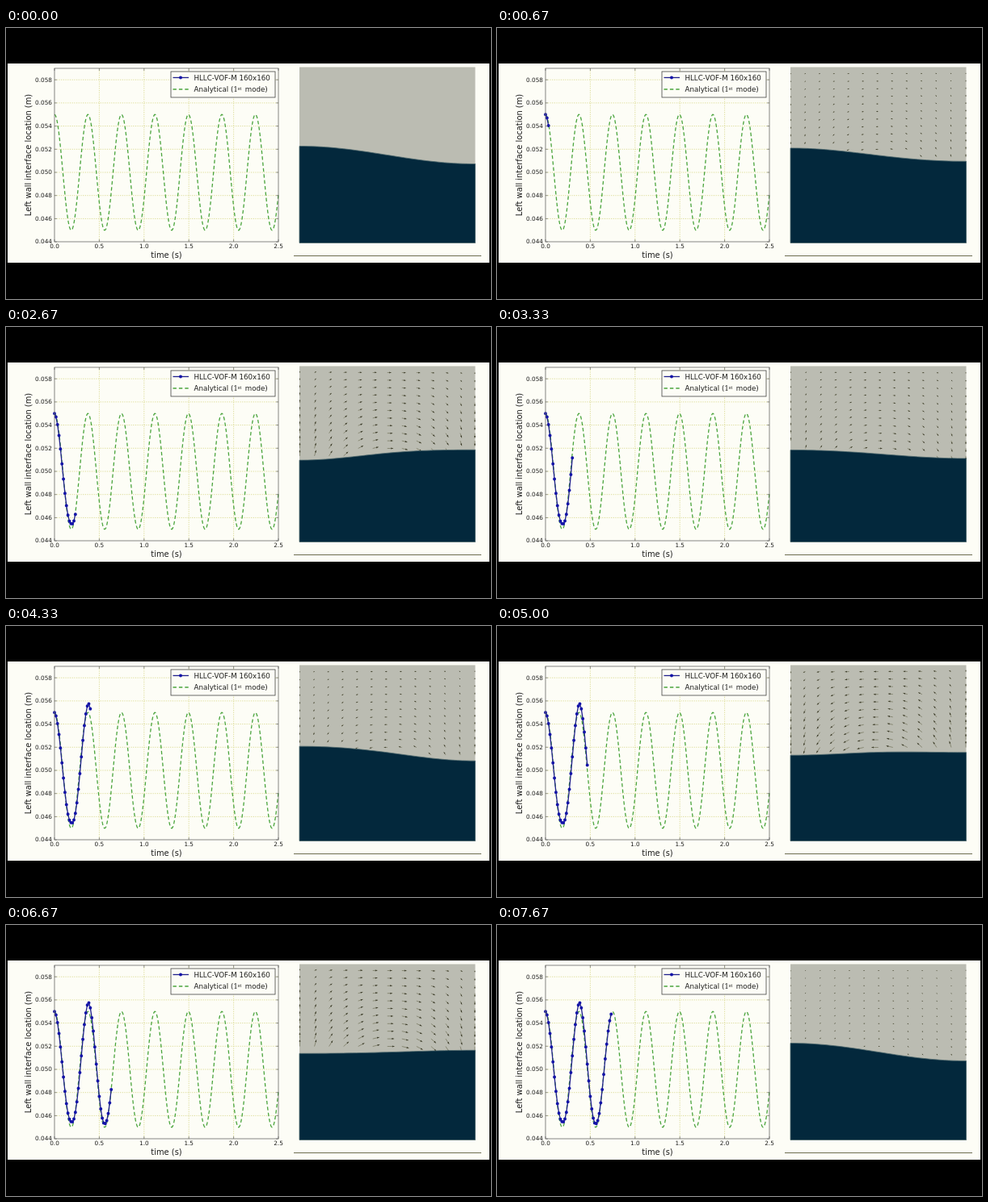
These frames come from a looping animation (600 px wide and 336 px high, 8 s). An HTML page:

```html
<!DOCTYPE html>
<html lang="en">
<head>
<meta charset="utf-8">
<title>Sloshing wave</title>
<style>
  html, body { margin: 0; width: 100%; height: 100%; overflow: hidden; background: #000; }
  svg { display: block; width: 100vw; height: 100vh; font-family: "DejaVu Sans", sans-serif; fill: #1c1c1c; }
  path { fill: none; }
  #grid { stroke: #d9d98c; stroke-width: .9; stroke-dasharray: 1.2 1.5; }
  #ticks { stroke: #555; stroke-width: .6; }
  .exact { stroke: #4aa43c; stroke-width: 1.3; stroke-dasharray: 4.4 3; }
  .sim { stroke: #20208c; stroke-width: 1.3; }
  .dots { stroke: #1414a8; stroke-width: 4; stroke-linecap: round; }
  .label { font-size: 9.9px; text-anchor: middle; }
  .legend { font-size: 8.7px; }
  #numbers { font-size: 7.3px; }
</style>
</head>
<body>
<svg viewBox="0 0 600 336">
  <rect width="600" height="336" fill="#000"/>
  <rect x="2" y="44" width="596" height="247" fill="#fdfdf6"/>

  <path id="grid"/>
  <path id="exact" class="exact"/>
  <path id="sim" class="sim"/>
  <path id="dots" class="dots"/>
  <path id="ticks"/>
  <rect x="60" y="50" width="277" height="215" fill="none" stroke="#666" stroke-width=".8"/>
  <g id="numbers"></g>
  <text class="label" x="198.5" y="284.5">time (s)</text>
  <text class="label" transform="translate(31 157.5) rotate(-90)">Left wall interface location (m)</text>

  <rect x="204" y="54" width="129" height="32" fill="#fdfdf6" stroke="#444" stroke-width=".8"/>
  <path class="sim" d="M206.5 61.5H226"/>
  <path class="dots" d="M216 61.5h0"/>
  <path class="exact" d="M206.5 76H226"/>
  <g class="legend">
    <text x="232.5" y="65">HLLC-VOF-M 160x160</text>
    <text x="232.5" y="79.3">Analytical (<tspan dx=".4" font-family="Noto Serif, serif" font-size="8">1<tspan dx=".4" dy="-2.8" font-size="6">st</tspan></tspan><tspan dx="1.5" dy="2.8"> mode)</tspan></text>
  </g>

  <rect x="363" y="48.5" width="217.5" height="218" fill="#bbbcb2"/>
  <path id="arrows" stroke="#66664a" stroke-width=".6"/>
  <path id="heads" style="fill: #3a3a28"/>
  <path id="water" style="fill: #03283c" stroke="#4d686c" stroke-width=".8"/>
  <path d="M356 282.5H588" stroke="#6c6c50"/>
</svg>
<script>
const $ = id => document.getElementById(id);
const draw = (id, d) => $(id).setAttribute('d', d);
const TAU = 2 * Math.PI, PERIOD = 0.3738;
const px = t => 60 + t * 110.8;
const py = v => 179 - (v - 50) * 14.35;   // v in millimetres
const line = pts => pts.length ? 'M' + pts.map(p => p.map(n => n.toFixed(2)).join(' ')).join('L') : '';

// piecewise linear through [position, value] pairs
function mix(keys, x) {
  const i = keys.findIndex(k => k[0] >= x);
  if (i < 0) return keys[keys.length - 1][1];
  if (i === 0) return keys[0][1];
  const [a, u] = keys[i - 1], [b, v] = keys[i];
  return u + (v - u) * (x - a) / (b - a);
}

function drawAxes() {
  let grid = '', ticks = '', text = '';
  for (let i = 0; i <= 5; i++) {
    const x = px(i / 2);
    if (i % 5) grid += `M${x} 50V265`;
    ticks += `M${x} 265v-3M${x} 50v3`;
    text += `<text x="${x}" y="273" text-anchor="middle">${(i / 2).toFixed(1)}</text>`;
  }
  for (let v = 44; v <= 58; v += 2) {
    const y = py(v);
    if (v > 44) grid += `M60 ${y}H337`;
    ticks += `M60 ${y}h3M337 ${y}h-3`;
    text += `<text x="57" y="${y + 2.3}" text-anchor="end">0.0${v}</text>`;
  }
  draw('grid', grid);
  draw('ticks', ticks);
  $('numbers').innerHTML = text;
  const pts = [];
  for (let i = 0; i <= 500; i++)
    pts.push([px(i / 200), py(50 + 5 * Math.cos(TAU * i / 200 / PERIOD))]);
  draw('exact', line(pts));
}

const swing = [[0, 5], [.19, 4.16], [.38, 5.96], [.565, 4.95], [.75, 4.7]];
const bend = [[0, 0], [.11, 1], [.243, -1.2], [.31, -.2], [.477, -1], [.643, .2], [.743, 0]];
const flow = [[.11, .55], [.243, 1], [.31, .6], [.477, .95], [.643, 1]];

function drawCurve(step) {
  const pts = [];
  for (let i = 0; i <= 2 * (step - 1); i++) {
    const t = i / 60, drift = -.35 * Math.sin(TAU * t / .9);
    pts.push([px(t), py(50 + drift + mix(swing, t) * Math.cos(TAU * t / .377))]);
  }
  draw('sim', line(pts));
  draw('dots', pts.map(p => `M${p[0]} ${p[1]}h0`).join(''));
}

function drawTank(step) {
  const t = step > 1 ? (step - 1) / 30 + .01 : 0;
  const phase = TAU * t / PERIOD, a = 11 * Math.cos(phase), b = mix(bend, t);
  const surface = s => 157.5 - a * Math.cos(Math.PI * s) - b * Math.cos(TAU * s);
  const top = [];
  for (let i = 0; i <= 40; i++) top.push([363 + i * 5.4375, surface(i / 40)]);
  draw('water', line(top) + 'V266.5H363Z');

  let shafts = '', heads = '';
  if (t) {
    const wave = Math.sin(phase);
    const speed = Math.sign(wave) * Math.max(.2, Math.abs(wave)) * mix(flow, t);
    for (let row = 0; row < 12; row++) for (let col = 0; col <= 12; col++) {
      const s = col / 12, x = 363.5 + s * 216.5, y = 56.5 + row * 9.4;
      if (y > surface(s) - 2) continue;
      const depth = Math.PI * (y - 48.5) / 218;
      const fx = -Math.sin(Math.PI * s) * Math.cosh(depth);
      const fy = Math.cos(Math.PI * s) * Math.sinh(depth);
      const scale = 6 * speed / Math.sqrt(Math.hypot(fx, fy));
      const u = fx * scale, v = fy * scale;
      const size = Math.hypot(u, v), c = u / size, d = v / size;
      const ex = x + u, ey = y + v, h = Math.min(2.8, 1 + size * .3), w = h * .36;
      const bx = ex - h * c, by = ey - h * d;
      shafts += line([[x, y], [ex, ey]]);
      heads += line([[ex, ey], [bx - w * d, by + w * c], [bx + w * d, by - w * c]]) + 'Z';
    }
  }
  draw('arrows', shafts);
  draw('heads', heads);
}

let shown = -1;
function tick(now) {
  const step = Math.min(23, Math.floor((now % 8000 + 4) * 3 / 1000));
  if (step !== shown) {
    shown = step;
    drawCurve(step);
    drawTank(step);
  }
  requestAnimationFrame(tick);
}

drawAxes();
tick(performance.now());
</script>
</body>
</html>
```
